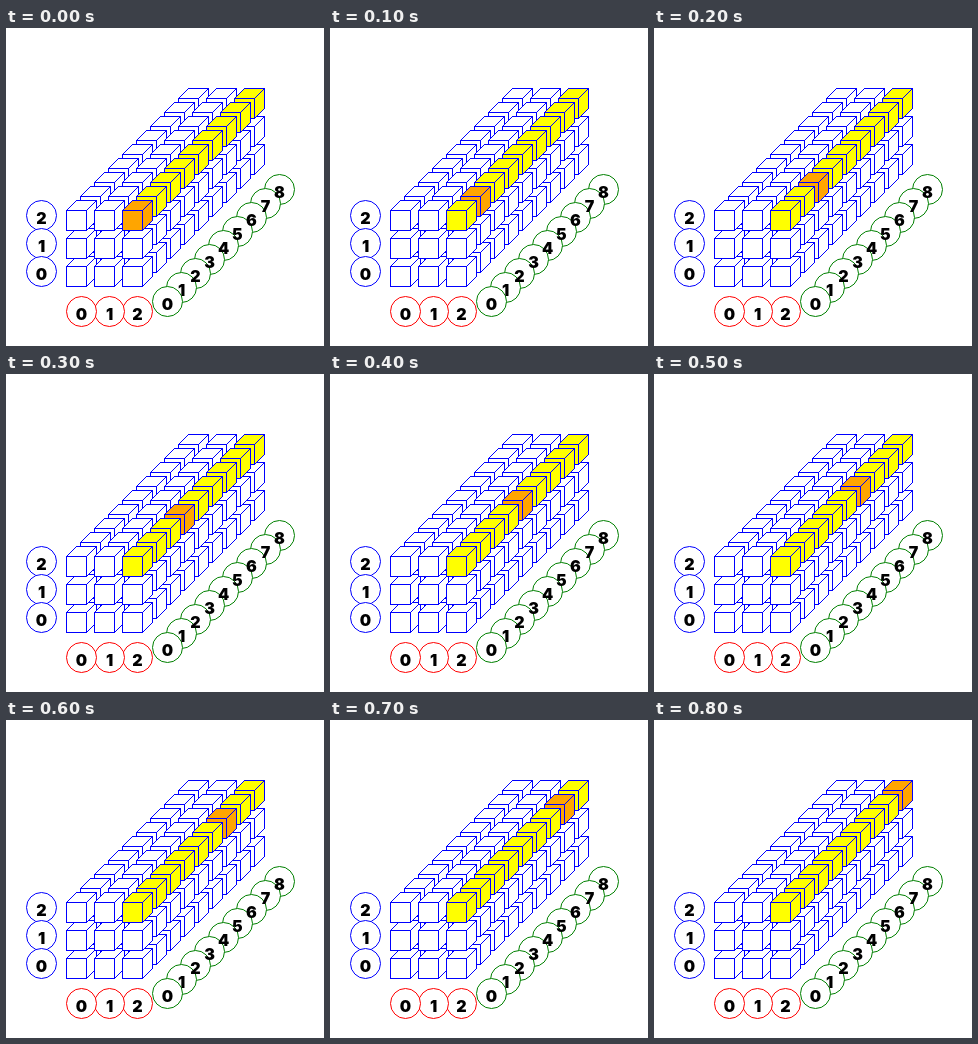
Animation of 318 by 318 pixels, one loop 900 ms. Source, as an HTML page with a canvas:

```html
<!DOCTYPE html>
<html lang="en">
<head>
<meta charset="utf-8">
<title>Cube row traversal</title>
<style>
  html, body { margin: 0; width: 100%; height: 100%; overflow: hidden; background: #fff; }
  canvas { display: block; }
</style>
</head>
<body>
<canvas id="stage" width="318" height="318"></canvas>
<script>
const ctx = document.getElementById('stage').getContext('2d');
const STEP_MS = 100, DEPTH = 9, SIDE = 3;
const PITCH = 28, SHIFT = 14;
const FACE = 20, SLANT = 10;

function dot(x, y, w = 1, h = 1) {
  ctx.fillRect(x, y, w, h);
}

// One-pixel diagonal rising to the right
function diagonal(x, y) {
  for (let i = 0; i <= SLANT; i++) dot(x + i, y - i);
}

function drawCube(x, y, fill) {
  const right = x + FACE, bottom = y + FACE;
  const farX = right + SLANT, farY = y - SLANT;

  ctx.fillStyle = fill;
  ctx.beginPath();
  [[x, y], [x + SLANT, farY], [farX, farY], [farX, bottom - SLANT], [right, bottom], [x, bottom]]
    .forEach(([px, py]) => ctx.lineTo(px + 0.5, py + 0.5));
  ctx.fill();

  ctx.fillStyle = '#00f';
  dot(x, y, FACE + 1);
  dot(x, bottom, FACE + 1);
  dot(x, y, 1, FACE + 1);
  dot(right, y, 1, FACE + 1);
  dot(x + SLANT, farY, FACE + 1);
  dot(farX, farY, 1, FACE + 1);
  diagonal(x, y);
  diagonal(right, y);
  diagonal(right, bottom);
}

// Circles overlap back to front, with every digit on top
function drawLabels(count, x, y, dx, dy, color) {
  ctx.strokeStyle = color;
  ctx.lineWidth = 1;
  for (let i = count - 1; i >= 0; i--) {
    ctx.beginPath();
    ctx.arc(x + i * dx + 0.5, y + i * dy + 0.5, 15, 0, Math.PI * 2);
    ctx.fillStyle = '#fff';
    ctx.fill();
    ctx.stroke();
  }
  ctx.fillStyle = '#000';
  for (let i = 0; i < count; i++) {
    ctx.fillText(i, x + i * dx + 0.5, y + i * dy + 9);
  }
}

function draw(active) {
  ctx.fillStyle = '#fff';
  dot(0, 0, 318, 318);

  for (let z = DEPTH - 1; z >= 0; z--) {
    for (let col = 0; col < SIDE; col++) {
      for (let row = 0; row < SIDE; row++) {
        const inRow = col === SIDE - 1 && row === SIDE - 1;
        const fill = !inRow ? '#fff' : z === active ? '#ffa500' : '#ff0';
        drawCube(60 + col * PITCH + z * SHIFT, 238 - row * PITCH - z * SHIFT, fill);
      }
    }
  }

  ctx.font = '900 16px Inter, "Liberation Sans", sans-serif';
  ctx.textAlign = 'center';
  drawLabels(SIDE, 35, 243, 0, -PITCH, '#00f');
  drawLabels(SIDE, 75, 283, PITCH, 0, '#f00');
  drawLabels(DEPTH, 161, 273, SHIFT, -SHIFT, '#008000');
}

const start = performance.now();
function tick(now) {
  draw(Math.floor(Math.max(0, now - start) / STEP_MS) % DEPTH);
  requestAnimationFrame(tick);
}
draw(0);
requestAnimationFrame(tick);
</script>
</body>
</html>
```
